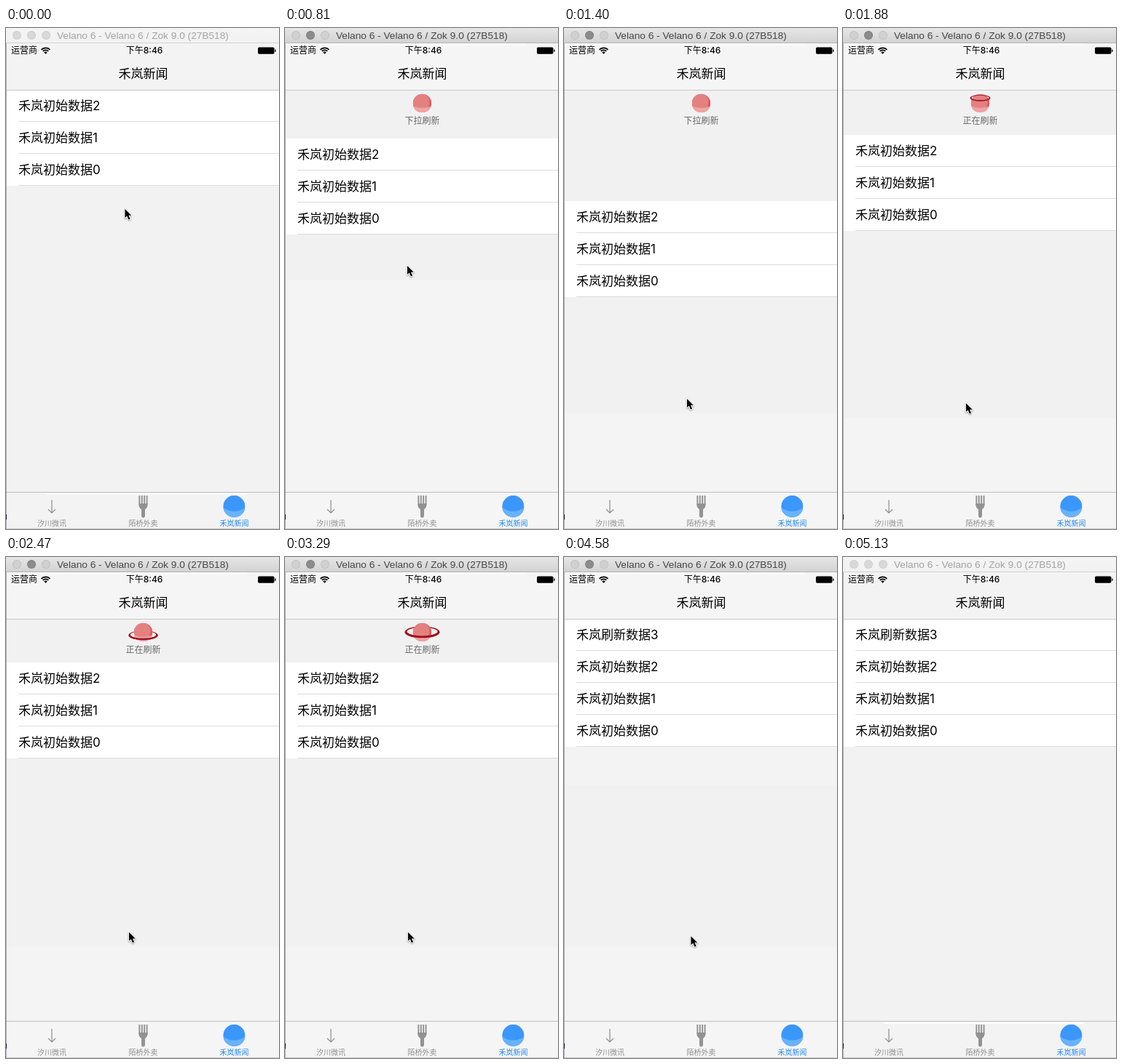
Write an HTML page with a canvas that moves like this. It is 375 px wide and 689 px high and loops after 5.16 s.

```html
<!DOCTYPE html>
<html lang="zh">
<head>
<meta charset="utf-8">
<style>
html, body { margin: 0; width: 100%; height: 100%; overflow: hidden; background: #f2f2f2; }
canvas { display: block; width: 375px; height: 689px; }
</style>
</head>
<body>
<canvas></canvas>
<script>
const W = 375, H = 689, LOOP = 5160;
const NAV_BOTTOM = 86, ROW = 44, REST = 60;
const BRAND = '禾岚';
const UI_FONT = 'Inter, "Noto Sans CJK SC", "Noto Sans CJK", sans-serif';
const canvas = document.querySelector('canvas');
const ctx = canvas.getContext('2d');
const ratio = window.devicePixelRatio || 1;
canvas.width = W * ratio;
canvas.height = H * ratio;

const bursts = [
  [350, 810, 4], [930, 1400, 4], [1520, 2000, 4], [2120, 2580, 4],
  [2700, 3170, 4], [3290, 3750, 4], [3870, 4110, 2], [4470, 4930, 4]
];
const pull = [[230, 0], [350, 7], [810, 67], [1400, 153], [1520, 155], [1640, 133],
  [1760, 79], [1880, 62], [2120, REST], [3750, REST], [3870, 52], [3990, 20], [4110, 0]];
const cursorX = [[0, 162], [350, 163], [810, 166.5], [1400, 167.5], [4350, 167.5],
  [4470, 173], [4590, 206], [4700, 258], [4820, 308], [4930, 340]];
const cursorY = [[0, 248.5], [110, 249], [350, 256], [810, 326.5], [1400, 509.5], [1520, 515.5],
  [4350, 515.5], [4470, 521], [4590, 560], [4700, 618], [4820, 673], [4930, 700]];

function quantise(t) {
  const burst = bursts.filter(b => b[0] <= t).pop();
  if (!burst) return t < 110 ? 0 : 110;
  const [start, end, count] = burst;
  const step = (end - start) / count;
  return Math.min(end, start + Math.floor((t - start) / step + 0.001) * step);
}

function sample(track, t) {
  const next = track.findIndex(key => key[0] > t);
  if (next < 0) return track[track.length - 1][1];
  if (next === 0) return track[0][1];
  const [t0, v0] = track[next - 1], [t1, v1] = track[next];
  return v0 + (v1 - v0) * (t - t0) / (t1 - t0);
}

function rect(x, y, w, h, color) {
  ctx.fillStyle = color;
  ctx.fillRect(x, y, w, h);
}

function disc(x, y, r, color) {
  ctx.fillStyle = color;
  ctx.beginPath();
  ctx.arc(x, y, r, 0, 7);
  ctx.fill();
}

function text(str, x, centerY, size, { color = '#000', align = 'left', weight = 400, font = UI_FONT } = {}) {
  ctx.font = `${weight} ${size}px ${font}`;
  ctx.textAlign = align;
  ctx.fillStyle = color;
  ctx.fillText(str, x, centerY + size * 0.37);
}

function clipped(outline, draw) {
  ctx.save();
  ctx.beginPath();
  outline();
  ctx.clip();
  draw();
  ctx.restore();
}

function drawTitleBar(active) {
  const shade = ctx.createLinearGradient(0, 0, 0, 20);
  shade.addColorStop(0, active ? '#e6e6e6' : '#f4f4f4');
  shade.addColorStop(1, active ? '#d3d3d3' : '#f2f2f2');
  rect(0, 0, W, 20, shade);
  rect(0, 20, W, 1, active ? '#b4b4b4' : '#d2d2d2');
  [15, 35, 55].forEach((x, i) => {
    const dark = active && i === 1;
    disc(x, 10, 6, dark ? '#777' : active ? '#bdbdbd' : '#cbcbcb');
    disc(x, 10, 5.3, dark ? '#8b8b8b' : active ? '#d0d0d0' : '#d8d8d8');
  });
  text('Velano 6 - Velano 6 / Zok 9.0 (27B518)', 70, 10, 13.7, {
    color: active ? '#454545' : '#a3a3a3',
    font: '"Liberation Sans", sans-serif'
  });
}

function drawWifi() {
  ctx.strokeStyle = '#000';
  ctx.lineWidth = 1.7;
  for (const r of [8.2, 5.2]) {
    ctx.beginPath();
    ctx.arc(54.5, 35.5, r, -Math.PI * 0.76, -Math.PI * 0.24);
    ctx.stroke();
  }
  ctx.fillStyle = '#000';
  ctx.beginPath();
  ctx.moveTo(54.5, 35.8);
  ctx.arc(54.5, 35.8, 3.2, -Math.PI * 0.76, -Math.PI * 0.24);
  ctx.fill();
}

function drawNavBar(active) {
  rect(0, 21, W, 64, active ? '#f5f5f5' : '#f3f3f3');
  if (active) rect(0, 21, 331, 3, '#fafafa');
  rect(0, 85, W, 1, '#c9c9c9');
  text('运营商', 7, 31, 12);
  drawWifi();
  text('下午8:46', 190, 31, 12, { align: 'center', weight: 500 });
  ctx.fillStyle = '#000';
  ctx.beginPath();
  ctx.roundRect(346, 26.5, 22.5, 9.2, 1.8);
  ctx.fill();
  rect(369.3, 29.6, 1.3, 3.2, '#000');
  text(BRAND + '新闻', 188.5, 63, 17, { align: 'center', weight: 500 });
}

function ringPath(cy, rx, ry) {
  ctx.beginPath();
  ctx.ellipse(188.5, cy, rx, ry, 0, 0, 7);
  ctx.closePath();
  ctx.ellipse(188.5, cy - ry * 0.09, rx * 0.88, ry * 0.73, 0, 0, 7);
}

function drawPlanet(x, y, r, base, low, { shore = 0.34, dip = 0.68, edge = base } = {}) {
  clipped(() => ctx.arc(x, y, r, 0, 7), () => {
    rect(x - r, y - r, r * 2, r * 2, edge);
    disc(x - r * 0.22, y - r * 0.12, r, base);
    ctx.fillStyle = low;
    ctx.beginPath();
    ctx.moveTo(x - r, y + r * shore);
    ctx.quadraticCurveTo(x, y + r * dip, x + r, y + r * shore);
    ctx.lineTo(x + r, y + r);
    ctx.lineTo(x - r, y + r);
    ctx.fill();
  });
}

function drawRefresh(t, offset) {
  const refreshing = t >= 1640;
  const spinning = t >= 1760;
  ctx.save();
  ctx.translate(0, Math.min(0, offset - REST));
  // The ring glides down and up the planet, widest at the middle.
  const phase = Math.max(0, t - 1780) / 1000;
  const u = (1 - Math.cos(Math.PI * phase)) / 2;
  const swell = Math.sin(Math.PI * u);
  const cy = 96 + 15 * u, rx = 13 + 11 * swell, ry = 4 + 4 * swell;
  const fillRing = () => {
    ringPath(cy, rx, ry);
    ctx.fillStyle = '#a3101a';
    ctx.fill('evenodd');
  };
  if (spinning) fillRing();
  drawPlanet(188.5, 103.5, 12.7, '#e38181', '#efa3a3', { edge: '#e05c5c' });
  if (spinning) clipped(() => ctx.rect(160, u < 0.2 ? 80 : cy, 60, 50), fillRing);
  text(refreshing ? '正在刷新' : '下拉刷新', 188.5, 128, 12, { color: '#666', align: 'center' });
  ctx.restore();
}

function drawList(t, offset) {
  const rows = ['初始数据2', '初始数据1', '初始数据0'];
  if (t >= 3860) rows.unshift('刷新数据3');
  const top = NAV_BOTTOM + offset;
  rect(0, top - 1, W, rows.length * ROW, '#fff');
  rows.forEach((label, i) => {
    const y = top + i * ROW;
    text(BRAND + label, 17, y + 21, 17);
    rect(17, y + 42, W - 17, 1, '#dcdcdc');
  });
}

function drawFork() {
  ctx.fillStyle = '#929292';
  for (let i = 0; i < 4; i++) ctx.fillRect(182.4 + i * 3.4, 643, 1.9, 13);
  ctx.beginPath();
  ctx.moveTo(182.4, 654);
  ctx.lineTo(194.5, 654);
  ctx.quadraticCurveTo(194.8, 660, 191, 662);
  ctx.lineTo(191, 671);
  ctx.quadraticCurveTo(190.8, 673.5, 188.5, 673.5);
  ctx.quadraticCurveTo(186, 673.5, 186, 671);
  ctx.lineTo(186, 662);
  ctx.quadraticCurveTo(182, 660, 182.4, 654);
  ctx.fill();
}

function drawTabBar(active) {
  rect(0, 638, W, 51, active ? '#f5f5f5' : '#f3f3f3');
  rect(0, 638, W, 1, '#bdbdbd');
  if (!active) rect(56, 640, 275, 2, '#fcfcfc');
  rect(0, H - 1, W, 1, '#cfcfcf');
  ctx.strokeStyle = '#8e8e8e';
  ctx.lineWidth = 1.2;
  ctx.beginPath();
  ctx.moveTo(63, 649);
  ctx.lineTo(63, 667);
  ctx.moveTo(58, 662);
  ctx.lineTo(63, 667);
  ctx.lineTo(68, 662);
  ctx.stroke();
  drawFork();
  drawPlanet(313.5, 658, 15, '#3b97fb', '#69b2fd', { shore: 0.12, dip: 0.78 });
  text('汐川微讯', 63, 681, 10, { color: '#8e8e8e', align: 'center' });
  text('陌桥外卖', 188.5, 681, 10, { color: '#8e8e8e', align: 'center' });
  text(BRAND + '新闻', 313.5, 681, 10, { color: '#2287f5', align: 'center' });
}

function drawCursor(x, y) {
  ctx.save();
  ctx.translate(x + 1, y);
  ctx.scale(0.9, 0.9);
  ctx.beginPath();
  [[0.5, 0.5], [0.5, 14], [3.6, 11.2], [6, 16.6], [8.4, 15.5], [6, 10.3], [10.3, 10.3]]
    .forEach(p => ctx.lineTo(...p));
  ctx.closePath();
  ctx.lineJoin = 'round';
  ctx.shadowColor = 'rgba(0,0,0,.4)';
  ctx.shadowBlur = 2 * ratio;
  ctx.shadowOffsetY = ratio;
  ctx.lineWidth = 2;
  ctx.strokeStyle = '#fff';
  ctx.stroke();
  ctx.shadowColor = 'transparent';
  ctx.fillStyle = '#000';
  ctx.fill();
  ctx.restore();
}

function render(time) {
  const t = quantise(time);
  const active = time >= 350 && time < 5130;
  const offset = sample(pull, t);
  ctx.setTransform(ratio, 0, 0, ratio, 0, 0);
  rect(0, 0, W, H, active ? '#f4f4f4' : '#f2f2f2');
  if (active) {
    const bandBottom = sample(cursorY, Math.min(t, 1520)) + 20;
    rect(0, NAV_BOTTOM, W, bandBottom - NAV_BOTTOM, '#f1f1f1');
    if (t >= 3860) rect(0, NAV_BOTTOM, W, 228, '#f3f3f3');
  }
  if (offset > 0 && t < 3860) drawRefresh(t, offset);
  drawList(t, offset);
  drawNavBar(active);
  drawTabBar(active);
  drawTitleBar(active);
  rect(0, 21, 1, H - 21, '#b5b5b5');
  rect(0, 669, 1, 7, '#1c1c50');
  if (time < 4930) drawCursor(sample(cursorX, t), sample(cursorY, t));
}

const begin = performance.now();
function tick() {
  render((performance.now() - begin) % LOOP);
  requestAnimationFrame(tick);
}
tick();
</script>
</body>
</html>
```
